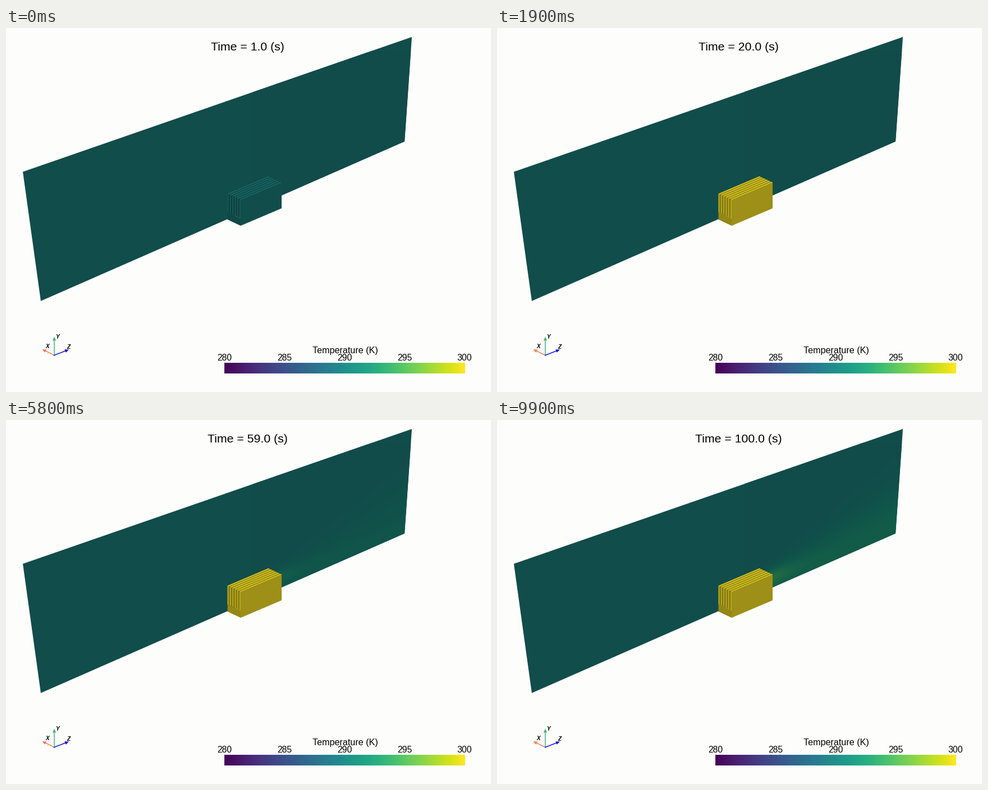
Write a matplotlib script that moves like this. It is 864 px wide and 648 px high and loops after 10000 ms.

```python
import numpy as np
import matplotlib.pyplot as plt
from matplotlib.animation import FuncAnimation
from matplotlib.patches import Polygon

W, H = 864, 648
FRAMES, INTERVAL = 100, 100
T_MIN, T_MAX, T_AIR = 280, 300, 290
WALL_LIGHT = 0.53
FINS = 6

plt.rcParams["font.family"] = "Liberation Sans"
viridis = plt.get_cmap("viridis")

fig = plt.figure(figsize=(W / 72, H / 72), dpi=72, facecolor="#fdfdfc")
ax = fig.add_axes([0, 0, 1, 1])
ax.axis("off")


def lit(temp, light):
    """Colour of a surface at a temperature, dimmed by its lighting."""
    x = (np.asarray(temp, float) - T_MIN) / (T_MAX - T_MIN)
    rgba = np.asarray(viridis(np.clip(x, 0, 1)))
    return rgba[..., :3] * light


def poly(points, color, z):
    return ax.add_patch(Polygon(points, fc=color, lw=0, zorder=z))


def label(x, y, s, size, **kw):
    return ax.text(x, y, s, size=size, color="black", ha="center",
                   va="baseline", zorder=10, **kw)


# Vertical slice through the air
slice_pts = [(30, 256), (723, 16), (710, 202), (62, 486)]
wall = poly(slice_pts, lit(T_AIR, WALL_LIGHT), 1)

# Warm wake behind the heat sink, computed on a coarse pixel grid
X0, X1, Y0, Y1 = 440, 724, 40, 320
gx, gy = np.meshgrid(np.arange(X0 + 1, X1, 2), np.arange(Y0 + 1, Y1, 2))
down = np.maximum(gx - 480, 0)
height = 486 - (gx - 62) * 0.4383 - gy
near = 4.0 * np.exp(-down / 32) * np.exp(-((height - 20) / 15) ** 2)
far = 1.9 * np.exp(-((height - 8) / (20 + 0.22 * down)) ** 2)
onset = 1 / (1 + np.exp(-(gx - 482) / 5))
wake_shape = (near + far) * onset
wake = ax.imshow(lit(T_AIR + 0 * wake_shape, WALL_LIGHT),
                 extent=(X0, X1, Y1, Y0), aspect="auto",
                 interpolation="bilinear", zorder=2)
wake.set_clip_path(wall)

# Heat sink: a base block carrying parallel fins
corner = np.array([394.5, 295.0])
across = np.array([23.5, 11.0])
along = np.array([73.0, -31.0])
drop = np.array([0, 46.0])
foot = np.array([0, 33.0])


def face(p, a, b, light, z):
    return poly([p, p + a, p + a + b, p + b], "k", z), light


faces = [
    face(corner, across, along, 0.50, 3),
    face(corner, across, foot, 0.42, 3),
    face(corner + foot, across, drop - foot, 0.50, 4),
    face(corner + across, along, drop, 0.53, 4),
]
pitch = across / (FINS - 0.5)
for i in range(FINS):
    p = corner + i * pitch
    faces.append(face(p, pitch / 2, along, 0.72, 5))
    faces.append(face(p, pitch / 2, foot, 0.62, 5))

# Colour bar
ax.imshow(np.linspace(0, 1, 256)[None, :], cmap=viridis, aspect="auto",
          extent=(389, 818, 615, 596), interpolation="nearest", zorder=3)
for k, temp in enumerate(range(T_MIN, T_MAX + 1, 5)):
    label(389 + 107 * k, 591.5, str(temp), 15.8)
label(604, 578.5, "Temperature (K)", 16.1)

# Orientation triad
origin = np.array([86, 582.5])
for name, tip, color, at in [
    ("X", (64.5, 572), "#f5784e", (74, 570)),
    ("Y", (86, 549.5), "#3fb573", (91, 553)),
    ("Z", (112, 572.5), "#0a0ae6", (111.5, 571)),
]:
    tip = np.array(tip)
    d = (tip - origin) / np.hypot(*(tip - origin))
    side = np.array([-d[1], d[0]])
    neck = tip - 7 * d
    ax.plot(*zip(origin, neck), color=color, lw=1.5, zorder=5)
    poly([tip, neck + 3 * side, neck - 3 * side], color, 6)
    label(*at, name, 10, weight="bold", style="italic")

title = label(430, 40.5, "", 21.3)
ax.set_xlim(0, W)
ax.set_ylim(H, 0)


def update(i):
    t = i + 1
    title.set_text(f"Time = {t:.1f} (s)")

    temp = min(T_AIR + 0.83 * (t - 1), T_MAX)
    glow = 1 + 0.17 * (temp - T_AIR) / (T_MAX - T_AIR)
    for patch, light in faces:
        patch.set_facecolor(lit(temp, light * glow))

    strength = np.clip((t - 22) / 78, 0, 1) ** 0.9
    rise = strength * wake_shape
    light = WALL_LIGHT * (1 + 0.02 * rise)
    wake.set_data(lit(T_AIR + rise, light[..., None]))
    return [title, wake] + [patch for patch, _ in faces]


anim = FuncAnimation(fig, update, frames=FRAMES, interval=INTERVAL,
                     repeat=True, repeat_delay=0, blit=False)
plt.show()
```
